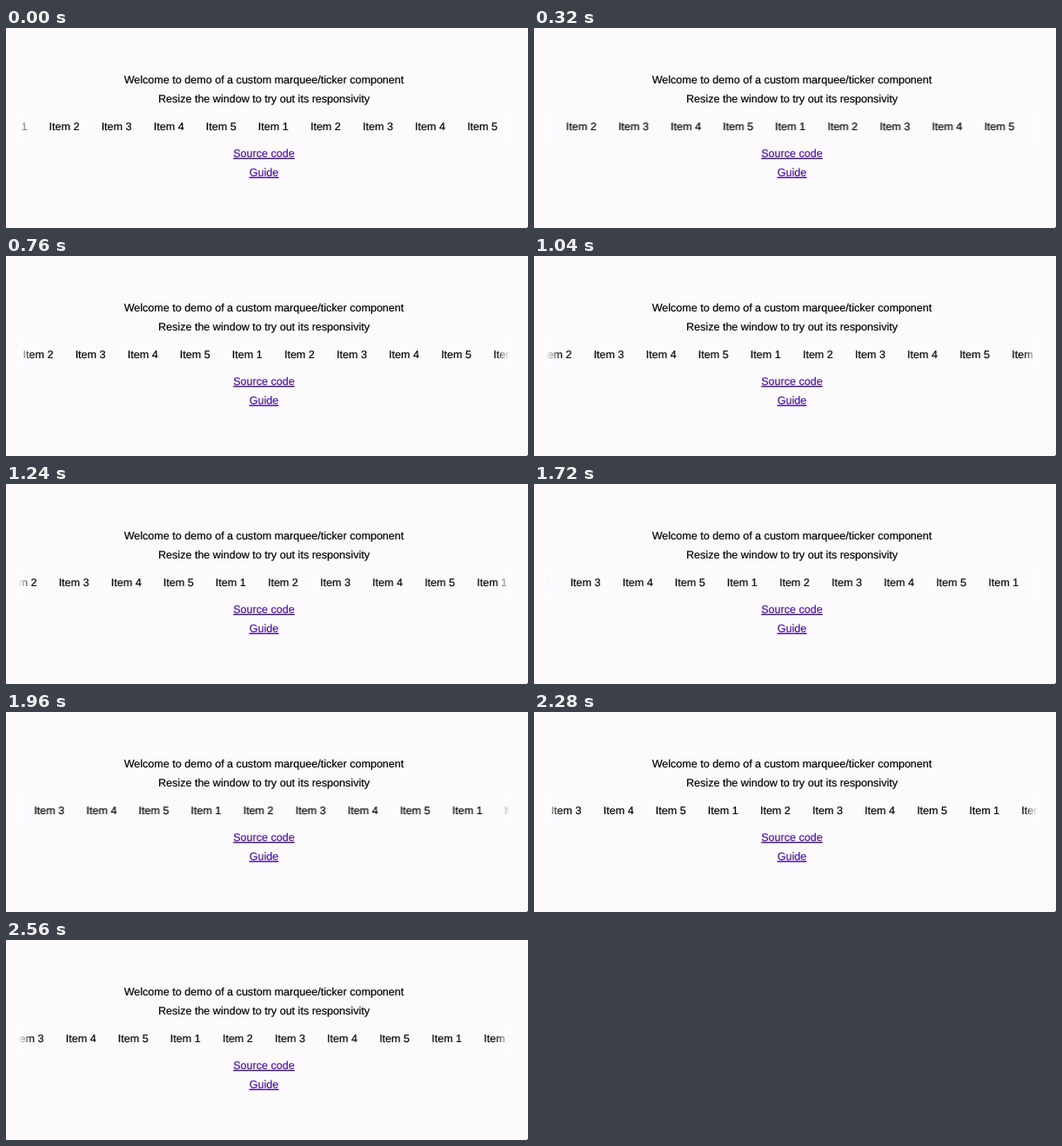
An HTML page for the animation above (2600 ms loop, 600 by 231 pixels).

```html
<!DOCTYPE html>
<html lang="en">
<head>
<meta charset="utf-8">
<title>Ticker demo</title>
<style>
  html, body { margin: 0; width: 100%; height: 100%; overflow: hidden; background: #fdfbfe; }
  svg { display: block; width: 600px; height: 231px; }
  text {
    font: 12.57px "Liberation Sans", Arial, sans-serif;
    text-rendering: geometricPrecision;
    fill: #000;
    stroke: #000;
    stroke-width: .2px;
  }
  .centre text { text-anchor: middle; }
  .centre .link { fill: #4b1786; stroke: #4b1786; text-decoration: underline; }
  #items { animation: scroll 2600ms steps(65) -4ms infinite; }
  @keyframes scroll { to { transform: translateX(-102.7px); } }
</style>
</head>
<body>
<svg viewBox="0 0 600 231">
  <defs>
    <linearGradient id="fade">
      <stop offset="0" stop-color="#fdfbfe"/>
      <stop offset="1" stop-color="#fdfbfe" stop-opacity="0"/>
    </linearGradient>
    <clipPath id="window"><rect x="14" y="100" width="565" height="30"/></clipPath>
  </defs>
  <g class="centre">
    <text x="296.5" y="64">Welcome to demo of a custom marquee/ticker component</text>
    <text x="296.5" y="86">Resize the window to try out its responsivity</text>
    <text class="link" x="296.5" y="149">Source code</text>
    <text class="link" x="296.5" y="171">Guide</text>
  </g>
  <g clip-path="url(#window)">
    <g id="items"></g>
    <rect id="edge" x="14" y="100" width="16" height="30" fill="url(#fade)"/>
    <use href="#edge" transform="matrix(-1 0 0 1 593 0)"/>
  </g>
  <path d="M600 229.5V231H598.5Z" fill="#333"/>
</svg>
<script>
  const items = document.getElementById('items');
  const start = -10.5, pitch = 60.07;
  for (let i = 0; i < 12; i++) {
    const item = document.createElementNS('http://www.w3.org/2000/svg', 'text');
    item.setAttribute('x', start + i * pitch);
    item.setAttribute('y', 118);
    item.textContent = `Item ${i % 5 + 1}`;
    items.append(item);
  }
</script>
</body>
</html>
```
